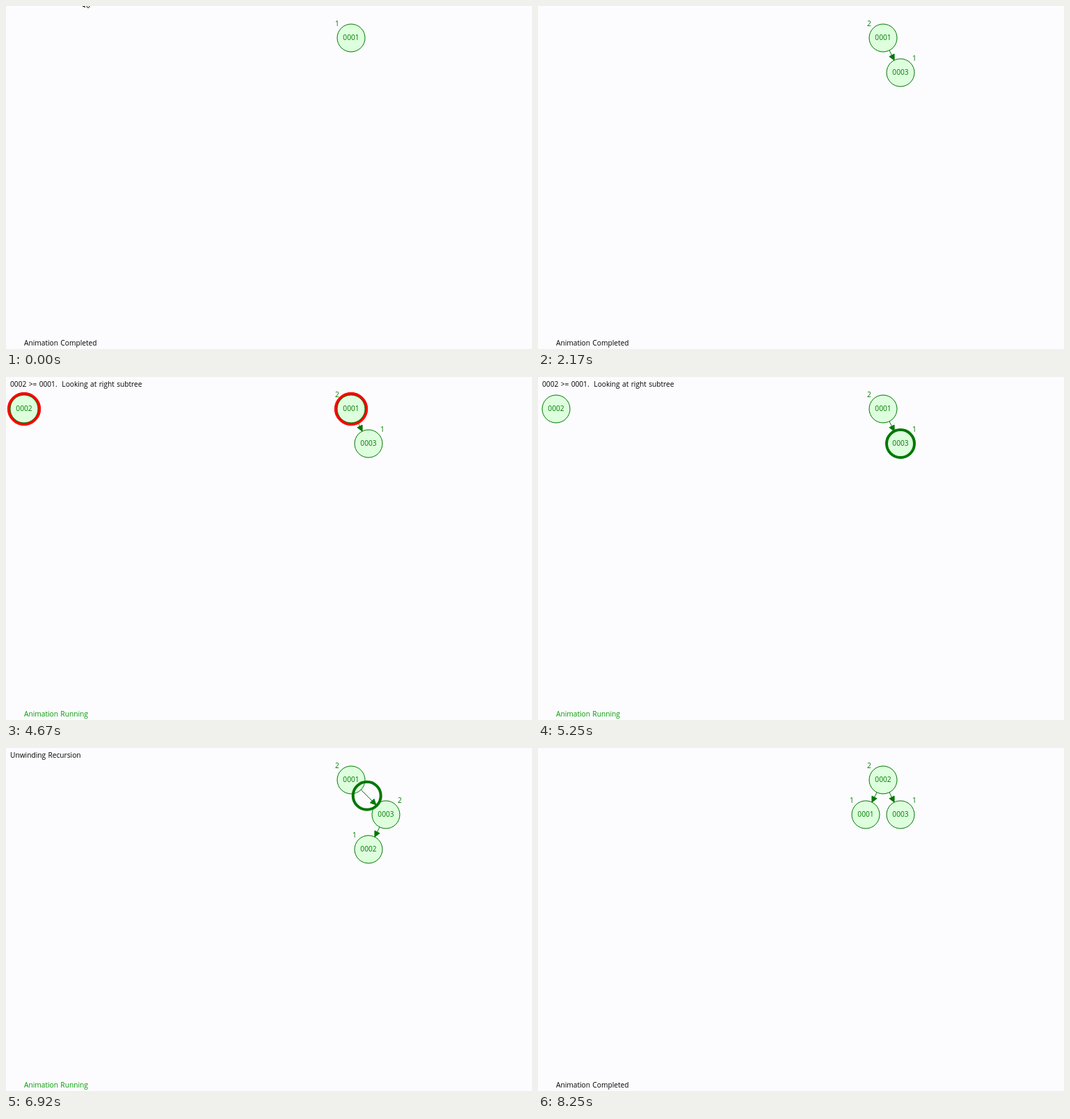
These frames come from a looping animation (756x494 px, 9330 ms). An HTML page with a canvas:

```html
<!DOCTYPE html>
<html lang="en">
<head>
<meta charset="utf-8">
<title>Balanced tree insertion</title>
<style>
html, body { margin: 0; width: 100%; height: 100%; overflow: hidden; background: #fcfcfe; }
canvas { display: block; }
</style>
</head>
<body>
<canvas id="stage" width="756" height="494"></canvas>
<script>
const ctx = document.getElementById('stage').getContext('2d', { alpha: false });
const GREEN = '#007700', RED = '#ff0000', FILL = '#ddffdd';
const LOOP = 9330, TICK = 1000 / 12, FRAME = 1000 / 60;
const STEP = 369, MOVE_FRAMES = 22, R = 20;

// Places: waiting spot, root, and the children's slots
const WAIT = { x: 26, y: 46, lx: 76, ly: 76 };
const slot = (x, y, side) => ({ x, y, lx: x + side * 20, ly: y - 20 });
const ROOT = slot(496, 46, -1), LEFT = slot(471, 96, -1), RIGHT = slot(521, 96, 1);
const FAR = slot(546, 96, 1), INNER = slot(521, 146, -1);

const pad = v => String(v).padStart(4, '0');
const node = (value, height, from, to = from) => ({ value, height, from, to });
const NULL_TREE = 'Found null tree, inserting element';
const UNWIND = 'Unwinding Recursion';
const ADJUST = 'Adjusting height after recursive call';

const one = node(1, 1, ROOT), one2 = node(1, 2, ROOT), three = node(3, 1, RIGHT);
const waiting3 = node(3, '', WAIT), waiting2 = node(2, '', WAIT);
const pair = [one2, three], trio = [...pair, waiting2];
const chain = (h1, h3) => [node(1, h1, ROOT), node(3, h3, FAR), node(2, 1, INNER)];
const e13 = [[1, 3]], chainEdges = [[1, 3], [3, 2]], finalEdges = [[2, 1], [2, 3]];

const scenes = [];
const run = (start, list) => list.forEach((s, i) => scenes.push({ edges: [], ...s, start: start + i * STEP }));

run(0, [{ nodes: [one] }]);
run(290, [
  { text: ' Inserting 0003', nodes: [one, waiting3] },
  { text: '0003 >= 0001.  Looking at right subtree', nodes: [one, waiting3], hot: [1, 3] },
  { text: NULL_TREE, nodes: [one, node(3, 1, WAIT, RIGHT)], edges: e13, fast: true },
  { text: UNWIND, nodes: [one, three], edges: e13, ring: [RIGHT, ROOT] },
  { text: ADJUST, nodes: pair, edges: e13, changed: 1 },
  { nodes: pair, edges: e13 }
]);
run(4147, [
  { text: ' Inserting 0002', nodes: trio, edges: e13 },
  { text: '0002 >= 0001.  Looking at right subtree', nodes: trio, edges: e13, hot: [1, 2] },
  { text: '0002 >= 0001.  Looking at right subtree', nodes: trio, edges: e13, ring: [ROOT, RIGHT] },
  { text: '0002 < 0003.  Looking at left subtree', nodes: trio, edges: e13, hot: [2, 3] },
  { text: NULL_TREE, nodes: [one2, node(3, 1, RIGHT, FAR), node(2, 1, WAIT, INNER)], edges: chainEdges },
  { text: UNWIND, nodes: chain(2, 1), edges: chainEdges, ring: [INNER, FAR] },
  { text: ADJUST, nodes: chain(2, 2), edges: chainEdges, changed: 3 },
  { text: UNWIND, nodes: chain(2, 2), edges: chainEdges, ring: [FAR, ROOT] },
  { text: ADJUST, nodes: chain(3, 2), edges: chainEdges, changed: 1 },
  { text: 'Double Rotate Left', nodes: chain(3, 2), edges: chainEdges, hotEdges: true },
  { text: 'Double Rotate Left', edges: finalEdges,
    nodes: [node(1, 1, ROOT, LEFT), node(3, 1, FAR, RIGHT), node(2, 2, INNER, ROOT)] },
  { nodes: [node(1, 1, LEFT), three, node(2, 2, ROOT)], edges: finalEdges }
]);

const mix = (a, b, f) => a + (b - a) * f;

// Text sits on whole pixel rows
function write(text, x, y, color, align = 'left') {
  ctx.fillStyle = color;
  ctx.textAlign = align;
  ctx.fillText(text, x, Math.floor(y));
}

function disc(x, y, r, fill, stroke, width = 1) {
  ctx.beginPath();
  ctx.arc(x, y, r, 0, Math.PI * 2);
  if (fill) { ctx.fillStyle = fill; ctx.fill(); }
  ctx.strokeStyle = stroke;
  ctx.lineWidth = width;
  ctx.stroke();
}

function arrow(a, b, color) {
  const d = Math.hypot(b.x - a.x, b.y - a.y);
  const ux = (b.x - a.x) / d, uy = (b.y - a.y) / d;
  const tx = b.x - ux * R, ty = b.y - uy * R;
  const bx = tx - ux * 8, by = ty - uy * 8;
  ctx.strokeStyle = ctx.fillStyle = color;
  ctx.lineWidth = 1;
  ctx.beginPath();
  ctx.moveTo(a.x + ux * R, a.y + uy * R);
  ctx.lineTo(tx, ty);
  ctx.stroke();
  ctx.beginPath();
  ctx.moveTo(tx, ty);
  ctx.lineTo(bx - uy * 4, by + ux * 4);
  ctx.lineTo(bx + uy * 4, by - ux * 4);
  ctx.closePath();
  ctx.stroke();
  ctx.fill();
}

// Tip of the pointer peeking in at the top edge
function pointer(t) {
  ctx.fillStyle = '#222200';
  const dot = (x, y, w = 1, h = 1) => ctx.fillRect(x, y, w, h);
  if (t < 80) {
    dot(110, 0, 3);
    dot(112, 1, 2);
    dot(116, 0, 1, 2);
    dot(119, 0, 1, 2);
    dot(117, 2, 2);
  } else if (t < 163) {
    dot(103, 0, 3);
    dot(107, 0, 1, 2);
  } else if (t >= 3745 && t < 4412) {
    dot(103, 0, 3);
  }
}

function draw(t) {
  const s = scenes.findLast(scene => scene.start <= t);
  const f = Math.min(1, Math.ceil((t - s.start) / FRAME) / MOVE_FRAMES);
  const nf = s.fast ? 1 - (1 - f) ** 2 : f;
  const pulse = 3 + Math.abs(((t - 850) / FRAME / 7 + 2 + 400) % 4 - 2);

  ctx.fillStyle = '#fcfcfe';
  ctx.fillRect(0, 0, 756, 494);
  ctx.font = '10.2px "Open Sans", "Noto Sans", sans-serif';
  ctx.wordSpacing = '0.7px';
  pointer(t);

  const at = {};
  for (const { value, from, to } of s.nodes)
    at[value] = { x: mix(from.x, to.x, nf), y: mix(from.y, to.y, nf) };

  for (const [a, b] of s.edges) {
    if (s.hotEdges) arrow(at[a], at[b], RED);
    arrow(at[a], at[b], GREEN);
  }
  for (const { value } of s.nodes) {
    const { x, y } = at[value];
    if (s.hot?.includes(value)) disc(x, y, R + pulse, RED, RED);
    disc(x, y, R, FILL, GREEN);
    write(pad(value), x, y + 3, GREEN, 'center');
  }
  for (const { value, height, from, to } of s.nodes)
    write(height, mix(from.lx, to.lx, f), mix(from.ly, to.ly, f) + 3,
      s.changed === value ? RED : GREEN, 'center');

  if (s.ring) {
    const [a, b] = s.ring;
    disc(mix(a.x, b.x, f), mix(a.y, b.y, f), R, null, GREEN, 4);
  }
  if (s.text) {
    write(s.text, 6, 14, '#000');
    write('Animation Running', 26, 489, '#009900');
  } else {
    write('Animation Completed', 26, 489, '#000');
  }
}

const begin = performance.now();
function loop() {
  const t = (performance.now() - begin) % LOOP;
  draw(Math.floor((t + 4) / TICK) * TICK);
  requestAnimationFrame(loop);
}
loop();
</script>
</body>
</html>
```
